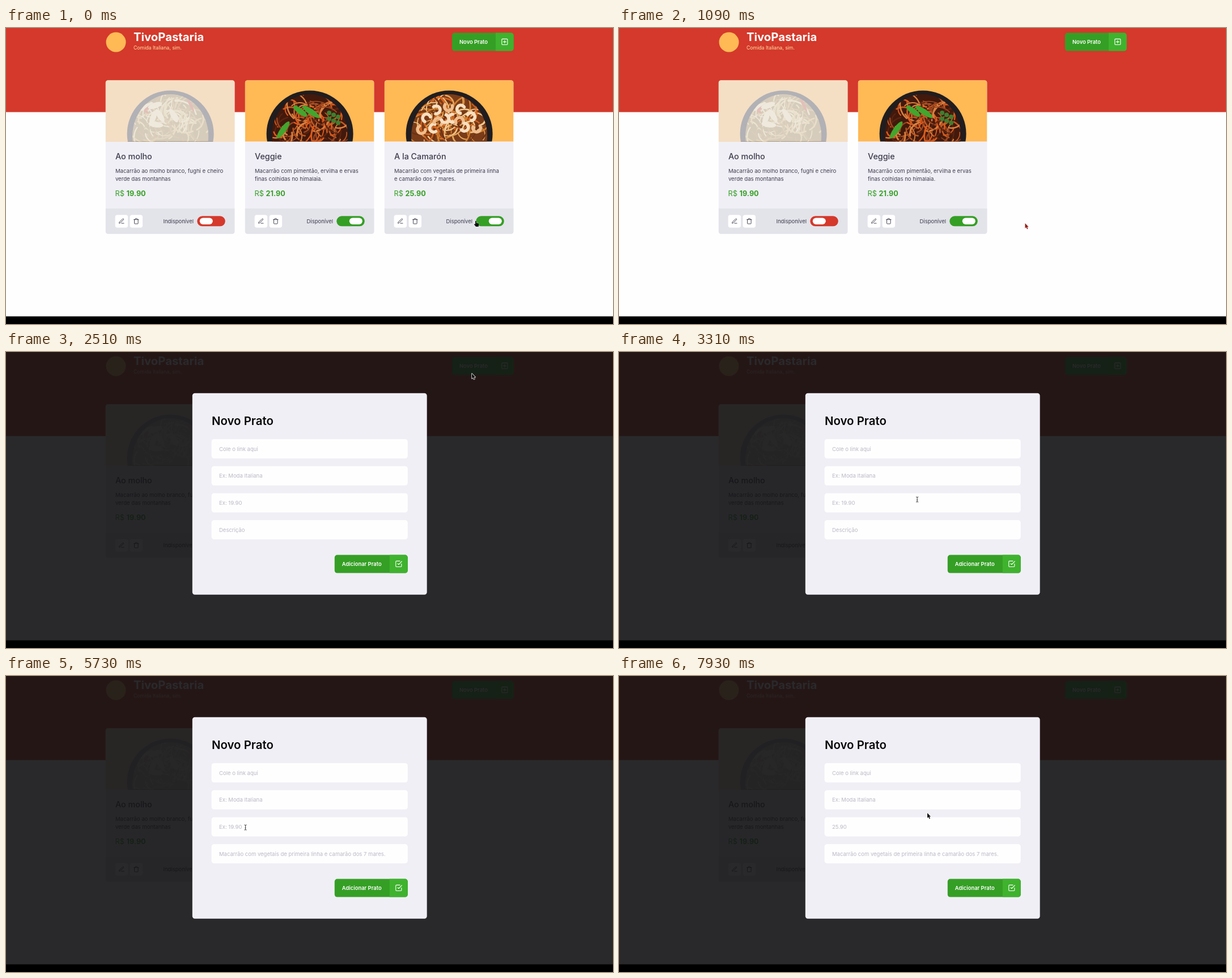
An HTML page with a canvas that plays this animation: 1071 px wide and 523 px high, repeating every 8 s.

```html
<!DOCTYPE html>
<html lang="pt">
<head>
<meta charset="utf-8">
<title>Pratos</title>
<style>
html, body { margin: 0; width: 100%; height: 100%; overflow: hidden; background: #fff; }
canvas { display: block; }
</style>
</head>
<body>
<canvas id="stage" width="1071" height="523"></canvas>
<script>
const W = 1071, H = 523, LOOP = 8000;
const g = document.getElementById('stage').getContext('2d');

const C = {
  red: '#d4392b', green: '#359f25', lime: '#3fb22e', orange: '#ffb955',
  panel: '#f0eff6', foot: '#e3e3ea', ink: '#3d3d4d', hint: '#b9b9c6'
};

const ICON = {
  pen: 'M12 20h9M16.5 3.5a2.1 2.1 0 0 1 3 3L7 19l-4 1 1-4z',
  trash: 'M3 6h18M19 6v14a2 2 0 0 1-2 2H7a2 2 0 0 1-2-2V6M8 6V4a2 2 0 0 1 2-2h4a2 2 0 0 1 2 2v2',
  plus: 'M5 3h14a2 2 0 0 1 2 2v14a2 2 0 0 1-2 2H5a2 2 0 0 1-2-2V5a2 2 0 0 1 2-2zM12 8v8M8 12h8',
  check: 'M9 11l3 3L22 4M21 12v7a2 2 0 0 1-2 2H5a2 2 0 0 1-2-2V5a2 2 0 0 1 2-2h11'
};
for (const k in ICON) ICON[k] = new Path2D(ICON[k]);

const ARROW = new Path2D('M0 0V9L2 7.1 3.5 10.4 5 9.7 3.6 6.6H6.2z');
const HAND = new Path2D('M0 .3Q1-1 1.8.3V3.5L5.4 4.2Q6.6 4.5 6.4 5.9L5.6 10H1.1L-2 6.3Q-2.2 4.9-.8 5.3L0 6z');
const BEAM = new Path2D('M-2.2-4.5Q0-4.5 0-3.4Q0-4.5 2.2-4.5M0-3.6V3.6M-2.2 4.5Q0 4.5 0 3.4Q0 4.5 2.2 4.5M-1 1h2');

function box(x, y, w, h, r, color) {
  g.fillStyle = color;
  g.beginPath();
  g.roundRect(x, y, w, h, r);
  g.fill();
}

function disc(x, y, r, color) {
  g.fillStyle = color;
  g.beginPath();
  g.arc(x, y, r, 0, 7);
  g.fill();
}

function arc(x, y, r, from, sweep, width, color) {
  g.strokeStyle = color;
  g.lineWidth = width;
  g.beginPath();
  g.arc(x, y, r, from, from + sweep);
  g.stroke();
}

function text(str, x, y, size, color, weight = 400, align = 'left') {
  g.font = `${weight} ${size}px Inter, "Open Sans", sans-serif`;
  g.textAlign = align;
  g.fillStyle = color;
  g.fillText(str, x, y);
}

function icon(path, x, y, scale, color) {
  g.save();
  g.translate(x, y);
  g.scale(scale, scale);
  g.translate(-12, -12);
  g.strokeStyle = color;
  g.lineWidth = 2;
  g.lineCap = g.lineJoin = 'round';
  g.stroke(path);
  g.restore();
}

function seeded(s) {
  return () => (s = (s * 16807) % 2147483647) / 2147483647;
}

function pepper(x, y, len, angle) {
  g.fillStyle = '#43a52d';
  g.beginPath();
  g.ellipse(x, y, len, 5, angle, 0, 7);
  g.fill();
}

function greens() {
  pepper(-47, -7, 18, -0.95);
  pepper(-17, -40, 15, 0.65);
  pepper(2, -39, 18, 0.6);
  for (let i = 0; i < 6; i++) disc(34 + i % 3 * 8, -37 + i * 3.5, 4, '#3f7f30');
}

function shrimps() {
  for (let i = 0; i < 13; i++) {
    const a = -2.95 + i * 0.225, d = i % 2 ? 30 : 50;
    arc(Math.cos(a) * d, Math.sin(a) * d + 2, 7, i, 4, 5.5, i % 3 ? '#f8dfc0' : '#f0bd8c');
  }
}

function chicken() {
  const rnd = seeded(44);
  for (let i = 0; i < 9; i++) {
    g.fillStyle = i % 3 ? '#f0dca4' : '#c6502f';
    g.beginPath();
    g.ellipse(rnd() * 96 - 48, -8 - rnd() * 46, 13, i % 3 ? 5 : 2.5, rnd() * 3, 0, 7);
    g.fill();
  }
}

const dishes = [
  { name: 'Ao molho', price: '19.90', on: false, seed: 71, topping: chicken,
    lines: ['Macarrão ao molho branco, fughi e cheiro', 'verde das montanhas'],
    base: '#9c7a37', tones: ['#e3c67c', '#edd79c', '#c39a4c', '#a98035', '#d9b563'] },
  { name: 'Veggie', price: '21.90', on: true, seed: 512, topping: greens,
    lines: ['Macarrão com pimentão, ervilha e ervas', 'finas colhidas no himalaia.'],
    base: '#42190c', tones: ['#c25a25', '#9a4520', '#d9803f', '#5b2410', '#dc5a1c'] },
  { name: 'A la Camarón', price: '25.90', on: true, seed: 930, topping: shrimps,
    lines: ['Macarrão com vegetais de primeira linha', 'e camarão dos 7 mares.'],
    base: '#7a3c18', tones: ['#e5a65c', '#d3812f', '#f2c98e', '#6b3216', '#d86420'] }
];

// Bowl of pasta, drawn around its own centre
function bowl(dish) {
  const rnd = seeded(dish.seed);
  disc(0, 0, 76.5, '#211d1f');
  g.save();
  g.beginPath();
  g.ellipse(0, 4, 67, 74, 0, 0, 7);
  g.clip();
  g.fillStyle = dish.base;
  g.fillRect(-80, -80, 160, 160);
  g.lineCap = 'round';
  for (let i = 0; i < 120; i++) {
    const a = -Math.PI * rnd(), d = 66 * Math.sqrt(rnd());
    arc(Math.cos(a) * d, Math.sin(a) * d + 8, 12 + rnd() * 24, rnd() * 6.3, 1.4,
      1.5 + rnd() * 1.5, dish.tones[i % 5]);
  }
  dish.topping();
  g.restore();
}

function card(dish, x) {
  g.save();
  g.beginPath();
  g.roundRect(x, 92.5, 228, 271.2, 4.5);
  g.clip();
  g.fillStyle = C.panel;
  g.fillRect(x, 92, 228, 272);
  g.fillStyle = C.foot;
  g.fillRect(x, 318.8, 228, 46);

  g.save();
  g.beginPath();
  g.rect(x, 92, 228, 108.4);
  g.clip();
  g.fillStyle = C.orange;
  g.fillRect(x, 92, 228, 109);
  g.translate(x + 114.5, 187);
  bowl(dish);
  g.restore();
  if (!dish.on) {
    g.globalAlpha = 0.7;
    g.fillStyle = C.panel;
    g.fillRect(x, 92, 228, 108.4);
    g.globalAlpha = 1;
  }
  g.restore();

  const l = x + 17;
  text(dish.name, l + 0.5, 232, 14.3, C.ink, 500);
  dish.lines.forEach((s, i) => text(s, l + 0.3, 256 + i * 14, 9.6, C.ink));
  text('R$', l, 297, 12.8, C.green);
  text(dish.price, l + 20, 297, 12.6, C.green, 700);

  box(l, 330.2, 22.5, 22.5, 4, '#fff');
  box(l + 26, 330.2, 22.5, 22.5, 4, '#fff');
  icon(ICON.pen, l + 11.2, 341.3, 0.47, C.ink);
  icon(ICON.trash, l + 37.2, 341.3, 0.47, C.ink);
  text(dish.on ? 'Disponível' : 'Indisponível', x + 155.5, 344.7, 9.5, C.ink, 400, 'right');
  box(x + 161.7, 332.3, 49.5, 18, 9, dish.on ? C.green : C.red);
  box(x + (dish.on ? 184.2 : 166.2), 335.5, 23, 11.5, 5.75, '#fff');
}

function button(x, y, w, split, label, path) {
  box(x, y, w, 32, 4.5, C.green);
  box(x + split, y, w - split, 32, [0, 4.5, 4.5, 0], C.lime);
  text(label, x + 13, y + 19.4, 9.4, '#fff', 600);
  icon(path, x + (split + w) / 2, y + 15.8, 0.56, '#fff');
}

function page(count) {
  g.fillStyle = '#fefefe';
  g.fillRect(0, 0, W, H);
  g.fillStyle = C.red;
  g.fillRect(0, 0, W, 148.6);
  disc(194, 25, 17.5, C.orange);
  text('TivoPastaria', 225, 23, 20.3, '#fff', 700);
  text('Comida Italiana, sim.', 225, 38.3, 8.7, '#ffe0a6');
  button(787, 8.6, 108.7, 77, 'Novo Prato', ICON.plus);
  dishes.slice(0, count).forEach((d, i) => card(d, 175.6 + i * 246));
}

const HINTS = ['Cole o link aqui', 'Ex: Moda Italiana', 'Ex: 19.90', 'Descrição'];
const DETAIL = 'Macarrão com vegetais de primeira linha e camarão dos 7 mares.';
const KEYS = [5830, 6230, 6630, 7030, 7230];

function modal(t) {
  g.fillStyle = 'rgba(18,18,20,.9)';
  g.fillRect(0, 0, W, H);
  box(328.8, 72.8, 413.9, 356, 4.5, C.panel);
  text('Novo Prato', 363, 128.5, 20.4, '#080808', 600);

  const values = ['', '', '25.90'.slice(0, KEYS.filter(k => t >= k).length), t >= 4410 ? DETAIL : ''];
  const focus = t >= 5030 ? 2 : 3;
  const caret = t >= 3710 && t < 4210 || t >= 4410 && t < 5730 || t >= 5830 && t < 7830;
  HINTS.forEach((hint, i) => {
    const y = 154 + i * 47.7;
    box(362.6, y, 346.2, 34, 4.5, '#fefefe');
    text(values[i] || hint, 376, y + 20.5, 9.5, C.hint);
    if (caret && focus === i) {
      const end = 376 + g.measureText(values[i]).width;
      g.fillStyle = '#555563';
      g.fillRect(Math.round(end), Math.round(y + 11), 1, 12);
    }
  });
  button(579.8, 358.6, 129, 97, 'Adicionar Prato', ICON.check);
}

// time, x, y
const PATH = [
  [0, 828, 341], [100, 828, 341], [850, 716.5, 345], [1110, 716.5, 345],
  [1710, 821, 41], [1900, 822, 38], [2810, 822, 38], [3510, 453, 315.5],
  [4330, 453, 315.5], [4710, 422.5, 267.5], [7760, 422.5, 267.5], [7910, 544, 242], [LOOP, 544, 242]
];

function pointerAt(t) {
  const i = PATH.findIndex(p => p[0] > t);
  const [t0, x0, y0] = PATH[i - 1], [t1, x1, y1] = PATH[i];
  const k = (t - t0) / (t1 - t0), e = k * k * (3 - 2 * k);
  return [x0 + (x1 - x0) * e, y0 + (y1 - y0) * e];
}

function pointer(t) {
  const [x, y] = pointerAt(Math.max(0, Math.floor((t - 10) / 100) * 100 + 10));
  const open = t >= 2510;
  const inField = open && x > 363 && x < 709 && y > 154 && y < 331 && (y - 154) % 47.7 < 34;
  const onLink = !open && (t < 990 && (x < 734 || x > 826) || y < 42 && x > 787);
  g.save();
  g.translate(x, y);
  g.lineJoin = 'round';
  if (inField) {
    g.strokeStyle = '#4b4b4e';
    g.lineWidth = 1.1;
    g.stroke(BEAM);
  } else {
    const shape = onLink ? HAND : ARROW;
    g.strokeStyle = onLink ? 'rgba(255,255,255,.35)' : '#fff';
    g.lineWidth = 1.4;
    g.stroke(shape);
    g.fillStyle = !open && !onLink && t >= 990 ? '#941d14' : '#111';
    g.fill(shape);
  }
  g.restore();
}

function draw(t) {
  page(t < 990 ? 3 : 2);
  if (t >= 2510) modal(t);
  g.fillStyle = '#000';
  g.fillRect(0, 509.5, W, 14);
  pointer(t);
}

const start = performance.now();
function frame() {
  draw((performance.now() - start) % LOOP);
  requestAnimationFrame(frame);
}
frame();
</script>
</body>
</html>
```
